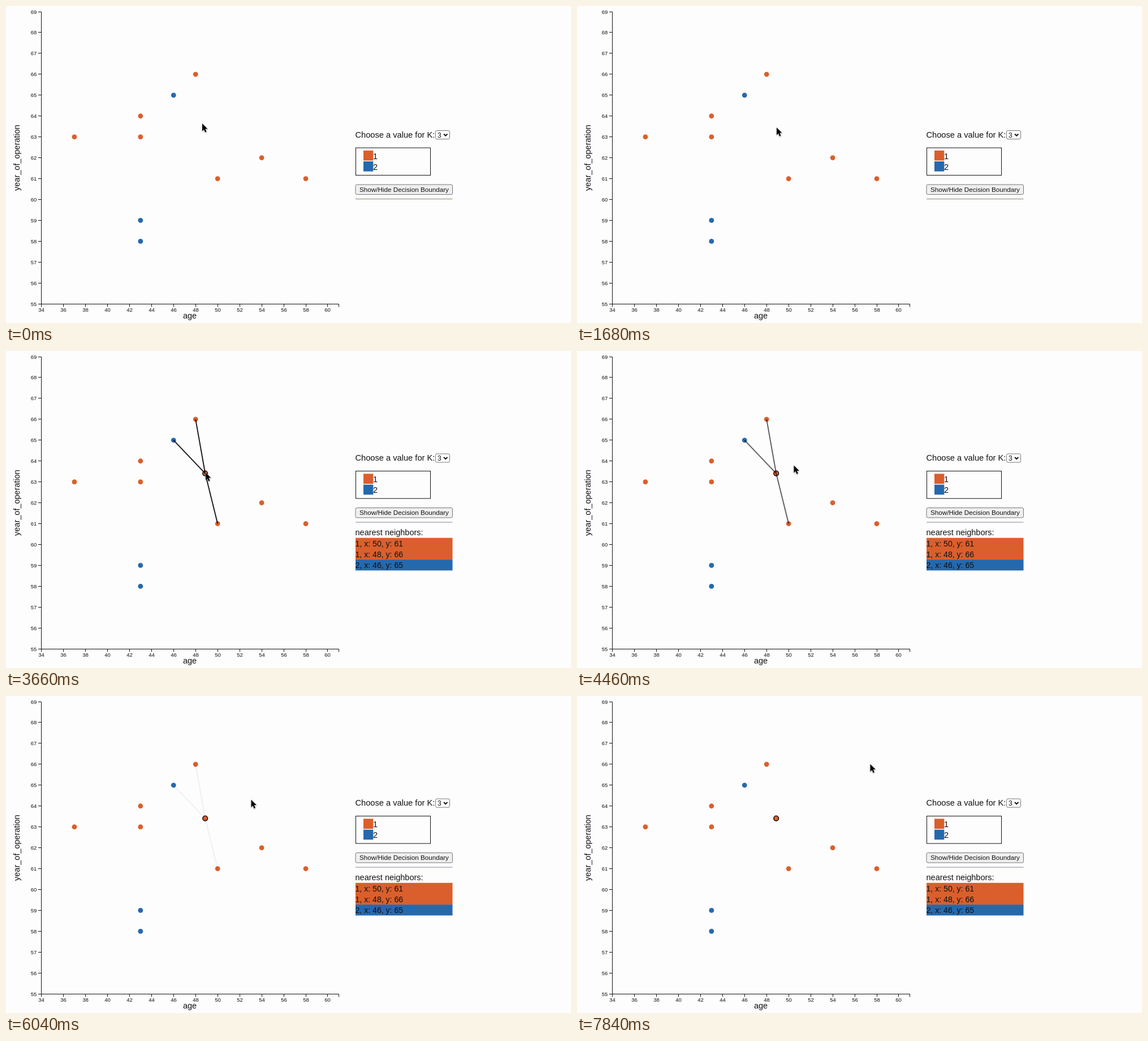
Recreate the animation shown at these times as an HTML page. Size 999 by 561 pixels, loop 8 s.

```html
<!DOCTYPE html>
<html lang="en">
<head>
<meta charset="utf-8">
<title>Nearest neighbors</title>
<style>
  html, body { margin: 0; width: 100%; height: 100%; overflow: hidden; background: #fdfdfd; }
  svg { display: block; width: 999px; height: 561px; }
  text { font-family: "Liberation Sans", Arial, sans-serif; font-size: 14.5px; fill: #111; }
  .tick { font-size: 9.5px; }
  .middle { text-anchor: middle; }
  .end { text-anchor: end; }
  .axis { fill: none; stroke: #111; stroke-width: 1; }
</style>
</head>
<body>
<svg viewBox="0 0 999 561">
  <g id="axes"></g>
  <text class="middle" transform="translate(24 268.5) rotate(-90)">year_of_operation</text>
  <text class="middle" x="325" y="553">age</text>
  <g id="dots"></g>
  <g id="query"></g>
  <g id="links" stroke="#000" stroke-width="1.9"></g>

  <g id="panel">
    <text x="617.5" y="194" style="font-size:14.65px">Choose a value for K:</text>
    <rect x="759.5" y="182" width="25" height="15" rx="2.5" fill="#fff" stroke="#767676"/>
    <text x="763" y="194" style="font-size:12px">3</text>
    <path d="M774 188l3.2 3.2l3.2-3.2" fill="none" stroke="#111" stroke-width="2"/>
    <rect x="618.5" y="212.5" width="132" height="48.5" fill="none" stroke="#111"/>
    <g id="legend"></g>
    <rect x="618" y="277.5" width="171.5" height="17.5" rx="2.5" fill="#efefef" stroke="#767676"/>
    <text class="middle" x="704" y="290.3" style="font-size:11.7px">Show/Hide Decision Boundary</text>
    <path id="rule" d="M618 303H789.5" stroke-width="1.2"/>
    <g id="result">
      <text x="617.5" y="326">nearest neighbors:</text>
      <g id="rows"></g>
    </g>
  </g>

  <path id="cursor" d="M0 0V13.2L3 10.4L5.2 15.4L7.5 14.4L5.3 9.6H9.5Z" fill="#000"
        stroke="#fff" stroke-width="1" paint-order="stroke"
        style="filter:drop-shadow(0 1px 1px #0005)"/>
</svg>
<script>
const LOOP = 8000, CLICK = 2200, FADE = 5000;
const COLORS = { 1: '#da5f2c', 2: '#2569ad' };
const $ = id => document.getElementById(id);
const px = age => 62.5 + (age - 34) * 19.48;
const py = year => 527.2 - (year - 55) * 36.94;

// [class, age, year]
const samples = [
  [1, 37, 63], [1, 43, 64], [1, 43, 63], [1, 54, 62], [1, 58, 61],
  [2, 43, 59], [2, 43, 58], [1, 50, 61], [1, 48, 66], [2, 46, 65],
];
const neighbors = samples.slice(-3);
const query = [1, 48.87, 63.41];

// [time, x, y] of the pointer tip
const pointerPath = [
  [0, 347, 208], [800, 353, 215], [4050, 353, 215], [4950, 423, 186],
  [5100, 423, 186], [5900, 433.5, 183.5], [7400, 433.5, 183.5], [7840, 518.5, 120.5],
];

const dot = ([kind, age, year], extra = '') =>
  `<circle cx="${px(age)}" cy="${py(year)}" r="4.4" fill="${COLORS[kind]}" ${extra}/>`;

function buildAxes() {
  let path = 'M57 10.5H62.5V527.5H588.5V532.5', labels = '';
  for (let age = 34; age <= 60; age += 2) {
    const x = Math.floor(px(age)) + 0.5;
    path += `M${x} 527.5v5`;
    labels += `<text class="tick middle" x="${x}" y="541.3">${age}</text>`;
  }
  for (let year = 55; year <= 69; year++) {
    const y = Math.floor(py(year)) + 0.5;
    path += `M57 ${y}h5.5`;
    labels += `<text class="tick end" x="54.3" y="${y + 3}">${year}</text>`;
  }
  $('axes').innerHTML = `<path class="axis" d="${path}"/>${labels}`;
}

function buildScene() {
  buildAxes();
  $('dots').innerHTML = samples.map(s => dot(s)).join('');
  $('query').innerHTML = dot(query, 'stroke="#000" stroke-width="1.4"');
  $('links').innerHTML = neighbors.map(([, age, year]) =>
    `<path d="M${px(query[1])} ${py(query[2])}L${px(age)} ${py(year)}"/>`).join('');
  $('legend').innerHTML = [1, 2].map((kind, i) =>
    `<rect x="632" y="${217.3 + i * 19.2}" width="17.3" height="17.7" fill="${COLORS[kind]}"/>
     <text x="649" y="${232 + i * 19.2}">${kind}</text>`).join('');
  $('rows').innerHTML = neighbors.map(([kind, age, year], i) =>
    `<rect x="618" y="${330.7 + i * 19.2}" width="171.5" height="19.3" fill="${COLORS[kind]}"/>
     <text x="617.5" y="${345.7 + i * 19.2}" style="font-size:14.1px">${kind}, x: ${age}, y: ${year}</text>`).join('');
}

const easeCubic = u => u < 0.5 ? 4 * u ** 3 : 1 - 4 * (1 - u) ** 3;

function pointerAt(t) {
  const next = pointerPath.findIndex(p => p[0] > t);
  if (next < 0) return pointerPath.at(-1).slice(1);
  const [t0, x0, y0] = pointerPath[next - 1], [t1, x1, y1] = pointerPath[next];
  const u = (t - t0) / (t1 - t0), s = u * u * (3 - 2 * u);
  return [x0 + (x1 - x0) * s, y0 + (y1 - y0) * s];
}

function draw(t) {
  const clicked = t >= CLICK;
  const progress = Math.min(1, Math.max(0, (t - CLICK) / FADE));
  for (const id of ['query', 'links', 'result'])
    $(id).setAttribute('visibility', clicked ? 'visible' : 'hidden');
  $('links').setAttribute('opacity', 1 - easeCubic(progress));
  $('panel').setAttribute('transform', `translate(0 ${clicked ? 0 : 38.5})`);
  $('rule').setAttribute('stroke', clicked ? '#8484a4' : '#86866a');
  $('cursor').setAttribute('transform', `translate(${pointerAt(t)})`);
}

buildScene();
const start = performance.now();
function tick() {
  draw((performance.now() - start) % LOOP);
  requestAnimationFrame(tick);
}
tick();
</script>
</body>
</html>
```
